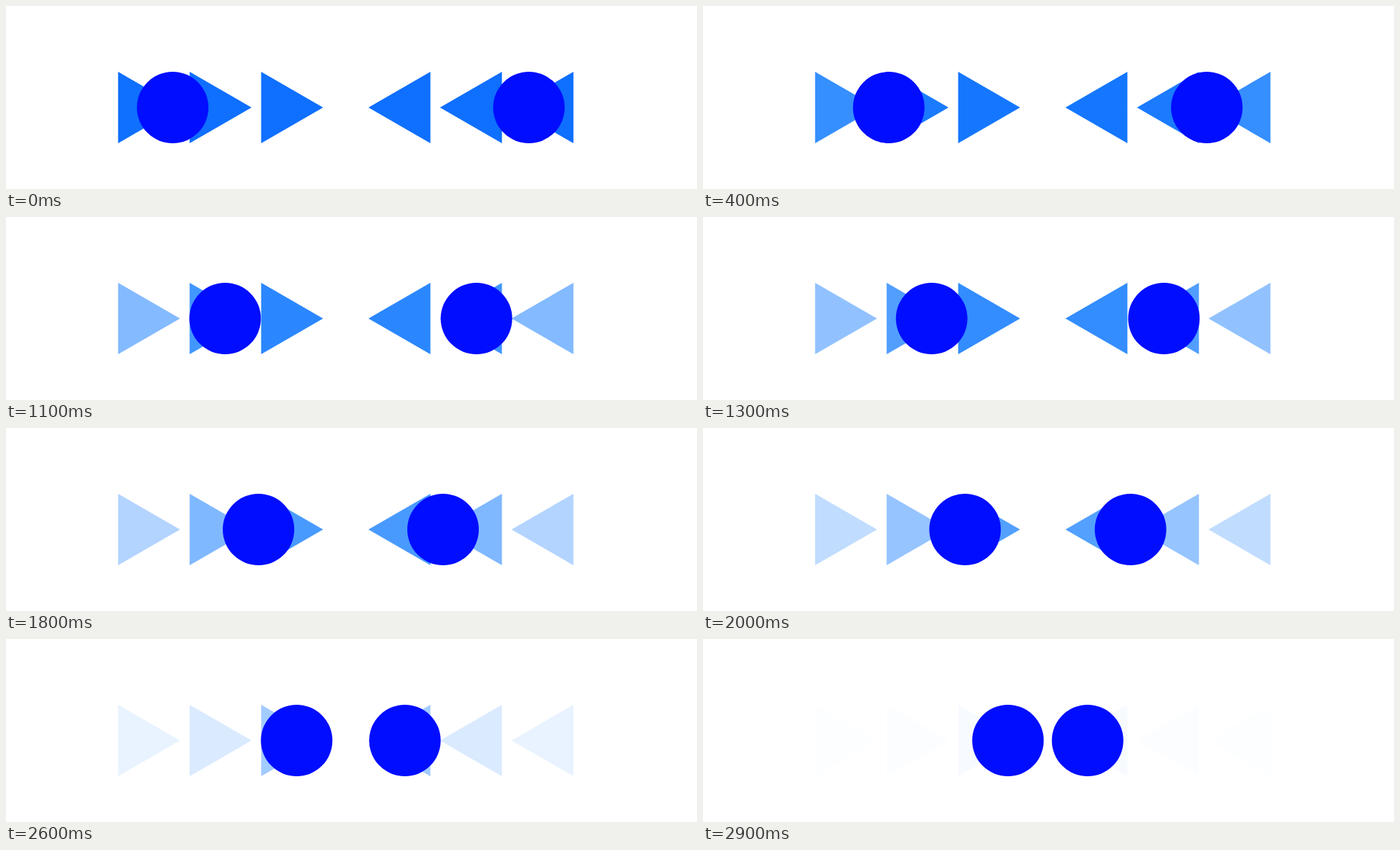
Animation, 966 px wide and 256 px high, one loop 3 s. Source, as an HTML page:

```html
<!DOCTYPE html>
<html lang="en">
<head>
<meta charset="utf-8">
<title>Converging circles</title>
<style>
html, body { margin: 0; width: 100%; height: 100%; overflow: hidden; background: #fff; }
svg { display: block; width: 966px; height: 256px; }
</style>
</head>
<body>
<svg viewBox="0 0 966 256">
  <g id="arrows"></g>
  <circle id="left" cy="142" r="50" fill="#000dff"/>
  <circle id="right" cy="142" r="50" fill="#000dff"/>
</svg>
<script>
const LOOP = 3000, STEP = 100, TRAVEL = 200;
const SIDE = 100, HEIGHT = SIDE * Math.sqrt(3) / 2, MIDDLE = 142;

// Each pair of arrows lightens until its turn, then fades to white.
const turns = [700, 1600, 2400], FADE_END = 2930;

const byId = id => document.getElementById(id);
const lerp = (a, b, k) => a + (b - a) * k;

function addArrow(center, dir) {
  const arrow = document.createElementNS("http://www.w3.org/2000/svg", "path");
  const base = center - dir * HEIGHT / 2;
  arrow.setAttribute("d", `M${base} ${MIDDLE - SIDE / 2}v${SIDE}l${dir * HEIGHT} ${-SIDE / 2}z`);
  byId("arrows").append(arrow);
  return arrow;
}

const pairs = turns.map((_, i) => [
  addArrow(200 + i * 100, 1),
  addArrow(750 - i * 100, -1)
]);

function colorAt(t, turn) {
  let red, green;
  if (t < turn) {
    const p = t / turn;
    red = lerp(15, 105, p ** 1.5);
    green = lerp(111, 171, p ** 1.15);
  } else {
    const p = (t - turn) / (FADE_END - turn);
    red = lerp(105, 255, p);
    green = lerp(171, 255, p);
  }
  return `rgb(${Math.round(red)},${Math.round(green)},255)`;
}

function draw(now) {
  const t = Math.floor((now % LOOP) / STEP) * STEP;
  const shift = TRAVEL * t / LOOP;
  byId("left").setAttribute("cx", 233 + shift);
  byId("right").setAttribute("cx", 731 - shift);
  pairs.forEach((pair, i) => {
    const color = colorAt(t, turns[i]);
    pair.forEach(arrow => arrow.setAttribute("fill", color));
  });
}

const start = performance.now();
function tick() {
  draw(performance.now() - start);
  requestAnimationFrame(tick);
}
tick();
</script>
</body>
</html>
```
